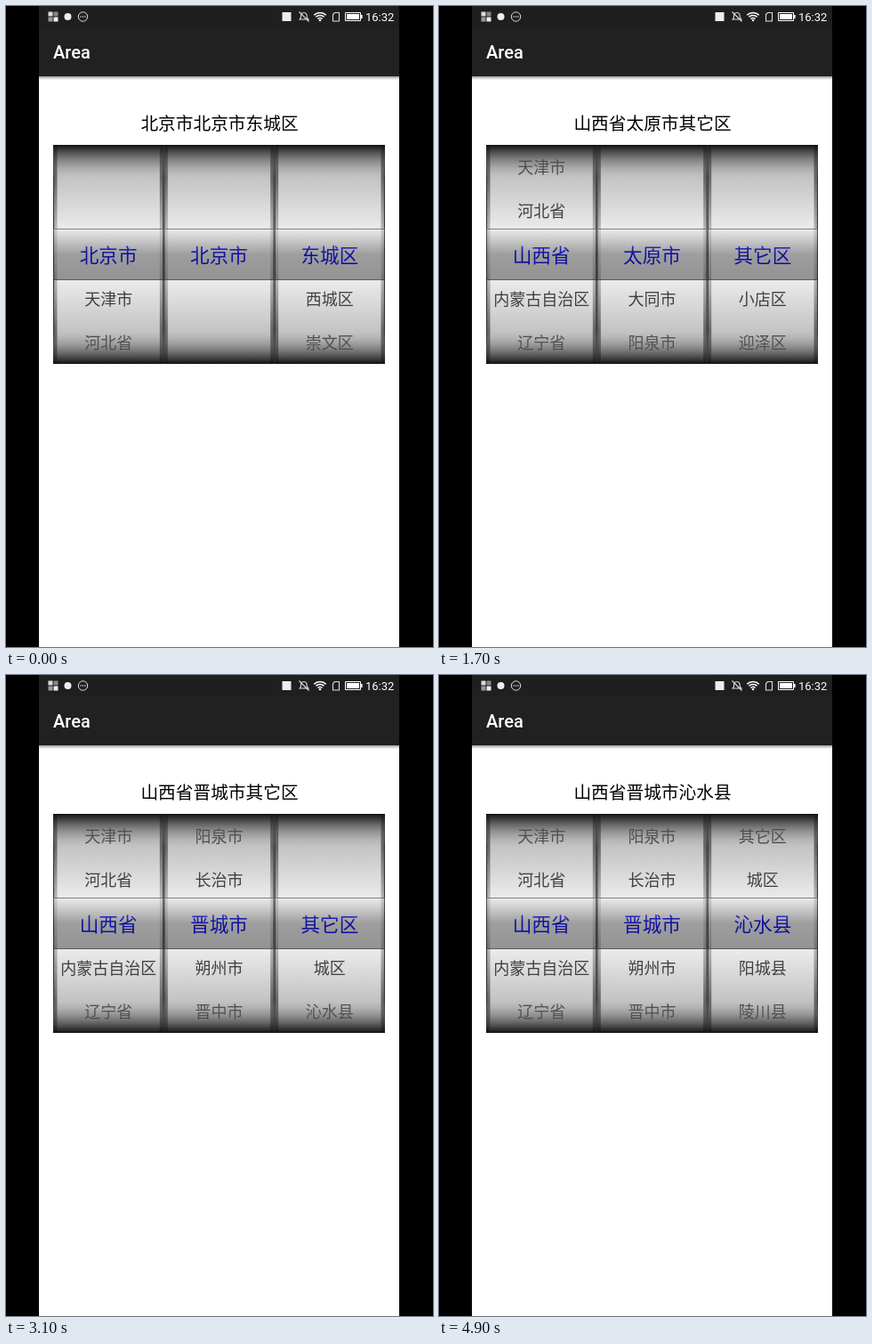
Recreate the animation shown at these times as an HTML page with a canvas. Size 480x720 px, loop 5 s.

```html
<!DOCTYPE html>
<html lang="zh-CN">
<head>
<meta charset="utf-8">
<title>Area</title>
<style>
  html, body { margin: 0; width: 100%; height: 100%; overflow: hidden; background: #000; }
  canvas { display: block; }
</style>
</head>
<body>
<canvas id="stage" width="480" height="720"></canvas>
<script>
const ctx = document.getElementById('stage').getContext('2d');
const LOOP = 5000, STEP = 100;
const CJK = '"Noto Sans CJK SC", "Noto Sans CJK", "Noto Sans CJK JP", sans-serif';
const LATIN = 'Roboto, sans-serif';

const TOP = 156, HEIGHT = 246, ITEM = 49.2, MID = TOP + HEIGHT / 2;
const LEFT = 53, WIDTH = 373 / 3;

const provinces = ['北京市', '天津市', '河北省', '山西省', '内蒙古自治区', '辽宁省', '吉林省'];
const cities = {
  北京市: ['北京市'],
  山西省: ['太原市', '大同市', '阳泉市', '长治市', '晋城市', '朔州市', '晋中市', '运城市']
};
const areas = {
  北京市: ['东城区', '西城区', '崇文区', '宣武区'],
  太原市: ['其它区', '小店区', '迎泽区', '杏花岭区'],
  晋城市: ['其它区', '城区', '沁水县', '阳城县', '陵川县', '泽州县']
};

// Scroll positions in rows; the last stretch of each path settles softly.
const paths = [
  [[800, 0], [900, 0.31], [1100, 1.4], [1300, 2.4], [1600, 3]],
  [[2200, 0], [2300, 0.45], [2400, 1.6], [2500, 2.9], [2600, 3.725], [3000, 4]],
  [[4100, 0], [4200, 0.4], [4300, 1.3], [4400, 1.91], [4800, 2]]
];
const settled = [1700, 3100, 4900];

function along(path, t) {
  if (t <= path[0][0]) return path[0][1];
  for (let i = 1; i < path.length; i++) {
    const [t0, p0] = path[i - 1], [t1, p1] = path[i];
    if (t >= t1) continue;
    const u = (t - t0) / (t1 - t0);
    return p0 + (p1 - p0) * (i === path.length - 1 ? 1 - (1 - u) ** 2 : u);
  }
  return path[path.length - 1][1];
}

function rect(x, y, w, h, fill) {
  ctx.fillStyle = fill;
  ctx.fillRect(x, y, w, h);
}

function vertical(y0, y1, ...colors) {
  const g = ctx.createLinearGradient(0, y0, 0, y1);
  colors.forEach((c, i) => g.addColorStop(i / (colors.length - 1), c));
  return g;
}

function text(str, x, y, font, fill, align = 'center') {
  ctx.font = font;
  ctx.fillStyle = fill;
  ctx.textAlign = align;
  ctx.fillText(str, x, y);
}

function chinese(str, x, mid, size, fill) {
  text(str, x, mid + size * 0.38, `${size}px ${CJK}`, fill);
}

function stroke(width, color, draw) {
  ctx.lineWidth = width;
  ctx.strokeStyle = color;
  ctx.beginPath();
  draw();
  ctx.stroke();
}

function disc(x, y, r, fill) {
  ctx.fillStyle = fill;
  ctx.beginPath();
  ctx.arc(x, y, r, 0, Math.PI * 2);
  ctx.fill();
}

function statusBar() {
  rect(47.5, 6.5, 5, 5, '#ddd');
  rect(53.5, 6.5, 5, 5, '#888');
  rect(47.5, 12.5, 5, 5, '#999');
  rect(53.5, 12.5, 5, 5, '#eee');
  disc(69.5, 12, 4, '#eee');

  stroke(1, '#ddd', () => ctx.arc(86.5, 12, 5.2, 0, Math.PI * 2));
  [-2.4, 0, 2.4].forEach(d => disc(86.5 + d, 12, 0.8, '#ddd'));

  rect(310.5, 7, 10, 10, '#eee');

  // Muted bell
  stroke(1.1, '#ddd', () => {
    ctx.moveTo(330, 15);
    ctx.lineTo(331.5, 13);
    ctx.quadraticCurveTo(331, 7.5, 335, 7.5);
    ctx.quadraticCurveTo(338.5, 7.5, 338.3, 13);
    ctx.lineTo(340, 15);
    ctx.closePath();
    ctx.moveTo(329.5, 6.5);
    ctx.lineTo(340.5, 17.5);
  });

  // Wi-Fi
  [3.6, 6.6, 9.6].forEach(r =>
    stroke(1.5, '#fff', () => ctx.arc(353, 17, r, -Math.PI * 0.75, -Math.PI * 0.25)));
  disc(353, 16, 1.3, '#fff');

  // Card and battery
  stroke(1.1, '#ddd', () => {
    ctx.moveTo(369.5, 7.5);
    ctx.lineTo(374.5, 7.5);
    ctx.lineTo(374.5, 17);
    ctx.lineTo(367.5, 17);
    ctx.lineTo(367.5, 9.5);
    ctx.closePath();
  });
  stroke(1, '#fff', () => ctx.rect(381.5, 7.5, 17, 9));
  rect(383, 9, 14, 6, '#fff');
  rect(399, 10, 1.6, 4, '#fff');

  text('16:32', 404, 16.5, `13px ${LATIN}`, '#fff', 'left');
}

function wheel(col, items, pos) {
  const x = LEFT + col * WIDTH, bottom = TOP + HEIGHT;
  rect(x, TOP, WIDTH, HEIGHT, vertical(TOP, bottom, '#333', '#ddd', '#333'));
  stroke(1.1, '#333', () => ctx.rect(x + 0.55, TOP + 0.55, WIDTH - 1.1, HEIGHT - 1.1));
  rect(x + 4.5, TOP + 1, WIDTH - 9, HEIGHT - 2, vertical(TOP, bottom, '#aaa', '#fff', '#aaa'));

  ctx.save();
  ctx.beginPath();
  ctx.rect(x, TOP, WIDTH, HEIGHT);
  ctx.clip();
  const picked = Math.round(pos);
  items.forEach((name, i) => {
    const y = MID + 0.8 + (i - pos) * ITEM;
    if (Math.abs(y - MID) > HEIGHT / 2 + ITEM / 2) return;
    chinese(name, x + WIDTH / 2, y, i === picked ? 21.6 : 18, i === picked ? '#00f' : '#404040');
  });
  ctx.restore();

  // Tinted window over the middle row
  rect(x, 250, WIDTH, 58, vertical(250, 308, '#eeeeee70', '#22222270', '#22222270'));
  stroke(1, '#33333390', () => ctx.rect(x + 0.5, 250.5, WIDTH - 1, 57));

  const shade = ITEM * 1.5;
  rect(x, TOP, WIDTH, shade, vertical(TOP, TOP + shade, '#111111ff', '#aaaaaa00', '#aaaaaa00'));
  rect(x, bottom - shade, WIDTH, shade,
    vertical(bottom - shade, bottom, '#aaaaaa00', '#aaaaaa00', '#111111ff'));
}

function draw(t) {
  rect(0, 0, 480, 720, '#000');
  rect(37, 0, 405, 720, '#fff');
  rect(37, 79, 405, 4, vertical(79, 83, '#00000060', '#00000000'));
  rect(37, 0, 405, 79, '#212121');
  rect(37, 0, 405, 24, '#1f1f1f');
  statusBar();
  text('Area', 53, 59, `500 20px ${LATIN}`, '#fff', 'left');

  const done = settled.map(s => t >= s);
  const province = provinces[done[0] ? 3 : 0];
  const cityList = cities[province];
  const city = cityList[done[1] ? 4 : 0];
  const areaList = areas[city];
  const area = areaList[done[2] ? 2 : 0];

  chinese(province + city + area, 240, 132, 19.7, '#000');
  [provinces, cityList, areaList].forEach((items, i) => wheel(i, items, along(paths[i], t)));
}

const start = performance.now();
function tick() {
  const t = (performance.now() - start) % LOOP;
  draw(Math.floor(t / STEP) * STEP);
  requestAnimationFrame(tick);
}
tick();
</script>
</body>
</html>
```
